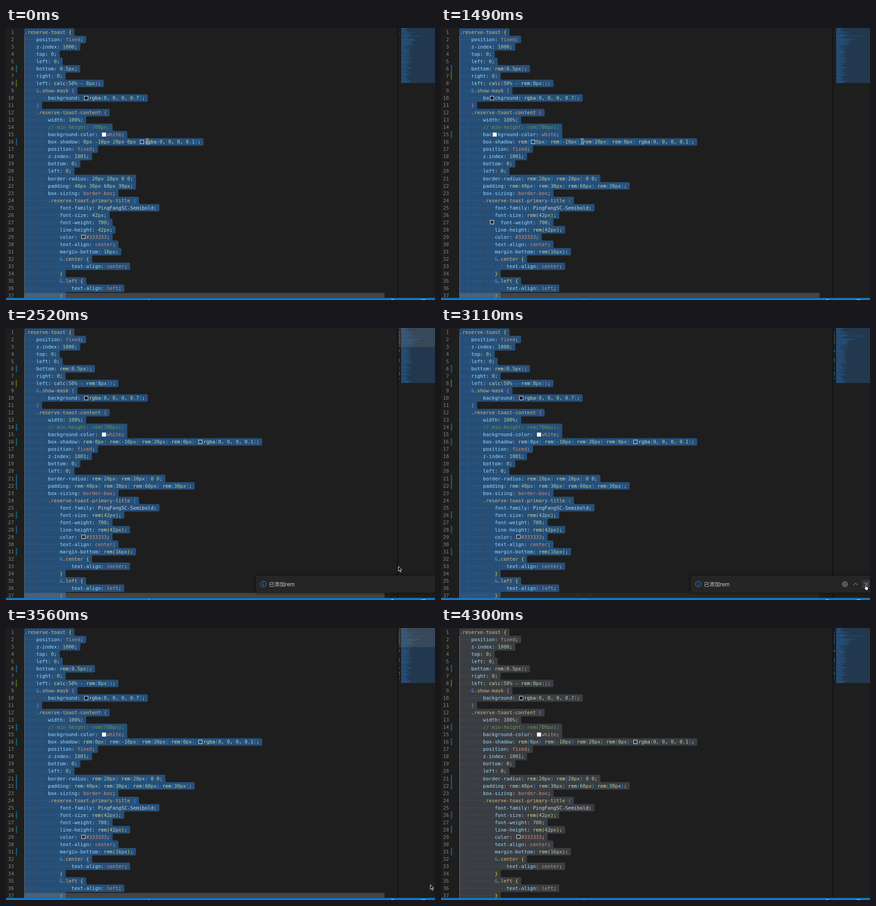
Animation, 939 px wide and 596 px high, one loop 4320 ms. Source, as an HTML page with a canvas:

```html
<!DOCTYPE html>
<html lang="en">
<head>
<meta charset="utf-8">
<title>px to rem</title>
<style>
html, body { margin: 0; width: 100%; height: 100%; overflow: hidden; background: #1e1e1e; }
canvas { display: block; }
</style>
</head>
<body>
<canvas id="stage" width="939" height="596"></canvas>
<script>
const g = document.getElementById('stage').getContext('2d');
const LOOP = 4320, X0 = 40.6, CW = 6.422, LH = 16.03, TOP = 1;
const MONO = '10.667px "DejaVu Sans Mono", monospace';
const STEPS = [0, 1340, 1490, 1630, 2230, 2380, 2520, 2670, 2810, 2960, 3110, 3410, 3560, 3700, 3850, 4150, 4300];
const BRACKETS = ['#ffd700', '#da70d6', '#179fff'];
const PLAIN = '#d4d4d4', NUMBER = '#b5cea8', WORD = '#ce9178', FUNC = '#dcdcaa';
const MODIFIED = '#1b81a8', ADDED = '#587c0c';

const before = `.reserve-toast {
    position: fixed;
    z-index: 1000;
    top: 0;
    left: 0;
    bottom: 0.5px;
    right: 0;
    left: calc(50% - 8px);
    &.show-mask {
        background: rgba(0, 0, 0, 0.7);
    }
    .reserve-toast-content {
        width: 100%;
        // min-height: 700px;
        background-color: white;
        box-shadow: 0px -10px 20px 0px rgba(0, 0, 0, 0.1);
        position: fixed;
        z-index: 1001;
        bottom: 0;
        left: 0;
        border-radius: 20px 20px 0 0;
        padding: 40px 30px 60px 30px;
        box-sizing: border-box;
        .reserve-toast-primary-title {
            font-family: PingFangSC-Semibold;
            font-size: 42px;
            font-weight: 700;
            line-height: 42px;
            color: #333333;
            text-align: center;
            margin-bottom: 16px;
            &.center {
                text-align: center;
            }
            &.left {
                text-align: left;
            }`.split('\n');
const after = before.map(s => s.replace(/-?[\d.]+px/g, 'rem($&)'));

// Swatches: line -> [column, fill]
const fills = { 10: 'rgba(0,0,0,.7)', 15: '#fff', 16: 'rgba(0,0,0,.1)', 29: '#333' };
const settled = lines => Object.fromEntries(Object.entries(fills).map(
  ([n, fill]) => [n, [lines[n - 1].search(/rgba|white|#333/), fill]]));
const shifted = { 10: [10, fills[10]], 15: [11, fills[15]], 16: [24, fills[16]], 27: [10, fills[29]] };

const cursors = [
  [0, 'beam', 309, 248.5], [2230, 'beam', 845.5, 520.5], [2380, 'arrow', 858.5, 518.5],
  [2520, 'arrow', 858.5, 522], [2670, 'arrow', 901, 554.5], [2810, 'arrow', 915.5, 554.5],
  [2960, 'arrow', 916, 562], [3110, 'hand', 926, 562], [3410, 'arrow', 928.5, 562],
  [3700, 'arrow', 913.5, 583], [3850, 'none', 0, 0]
];

function rect(color, x, y, w, h) {
  g.fillStyle = color;
  g.fillRect(x, y, w, h);
}

function round(color, x, y, w, h, r) {
  g.fillStyle = color;
  g.beginPath();
  g.roundRect(x, y, w, h, r);
  g.fill();
}

function line(color, width, ...pts) {
  g.strokeStyle = color;
  g.lineWidth = width;
  g.beginPath();
  pts.forEach(([x, y]) => g.lineTo(x, y));
  g.stroke();
}

function valueColor(tok, rest) {
  if (/^#/.test(tok)) return WORD;
  if (/^-?\d/.test(tok)) return NUMBER;
  if (/^[a-z]/.test(tok)) return rest[0] === '(' ? FUNC : WORD;
  return PLAIN;
}

// One colour per character
function paint(text, colored, state) {
  const out = Array(text.length).fill(PLAIN);
  const indent = text.search(/\S/);
  const comment = text.startsWith('//', indent);
  if (colored) {
    if (comment) out.fill('#6a9955');
    else if (/[.&]/.test(text[indent])) {
      out.fill('#d7ba7d');
      if (text[indent] === '&') out[indent] = '#569cd6';
    } else if (text.includes(':')) {
      const colon = text.indexOf(':');
      out.fill('#9cdcfe', 0, colon);
      const re = /#\w+|-?\d[\d.]*(px|%)?|[a-z][a-z-]*|[A-Z][\w-]*|./g;
      re.lastIndex = colon;
      for (let m; (m = re.exec(text));)
        out.fill(valueColor(m[0], text.slice(re.lastIndex)), m.index, re.lastIndex);
    }
  }
  if (!comment || !colored) [...text].forEach((c, i) => {
    if ('({'.includes(c)) out[i] = BRACKETS[state.depth++ % 3];
    if (')}'.includes(c)) out[i] = BRACKETS[--state.depth % 3];
  });
  return out;
}

function selection(lines, swatches, color) {
  const right = lines.map((s, i) => X0 + CW * (s.length + 1 + (swatches[i + 1] ? 2 : 0)));
  const R = 3;
  right.forEach((x, i) => {
    const y = TOP + i * LH, up = right[i - 1] || 0, down = right[i + 1] || 0;
    round(color, 40, y, x - 40, LH + .3, [i ? 0 : R, x > up ? R : 0, x > down ? R : 0, 0]);
    const notch = (ny, dir) => {
      g.beginPath();
      g.moveTo(x, ny);
      g.lineTo(x + R, ny);
      g.quadraticCurveTo(x, ny, x, ny + dir * R);
      g.fill();
    };
    if (up > x + R) notch(y, 1);
    if (down > x + R) notch(y + LH, -1);
  });
}

function guides(lines) {
  lines.forEach((s, i) => {
    const n = s.search(/\S/) / 4;
    for (let k = 0; k < n; k++)
      rect(k ? 'rgba(64,64,64,.75)' : '#707070', 40 + Math.round(k * 4 * CW), TOP + i * LH, 1, LH);
  });
}

function code(lines, swatches, colored) {
  const state = { depth: 0 };
  g.font = MONO;
  g.textBaseline = 'alphabetic';
  lines.forEach((text, i) => {
    const y = TOP + i * LH, base = y + 11.9, sw = swatches[i + 1];
    g.textAlign = 'right';
    g.fillStyle = '#858585';
    g.fillText(i + 1, 17.4, base);
    g.textAlign = 'left';
    const colors = paint(text, colored, state);
    for (let c = 0; c < text.length; c++) {
      const x = X0 + CW * (c + (sw && c >= sw[0] ? 2 : 0));
      if (text[c] === ' ') rect('rgba(227,228,226,.24)', x + 2.6, y + 7.6, 1.3, 1.3);
      else {
        g.fillStyle = colors[c];
        g.fillText(text[c], x, base);
      }
    }
    if (sw) {
      const x = Math.round(X0 + CW * sw[0] + 2) + .5, sy = Math.round(y + 3.6) + .5;
      rect(sw[1], x, sy, 8, 8);
      g.strokeStyle = '#eee';
      g.lineWidth = 1;
      g.strokeRect(x, sy, 8, 8);
    }
  });
}

function gutter(changed, added) {
  rect(ADDED, 21.5, TOP + (added - 1) * LH, 2, LH);
  changed.forEach(n => {
    const y = TOP + (n - 1) * LH;
    g.save();
    g.beginPath();
    g.rect(21.5, y, 2.8, LH);
    g.clip();
    for (let k = 0; k < 8; k++) line(MODIFIED, 1.2, [21, y + k * 2.7 + 1], [25, y + k * 2.7 - 2.5]);
    g.restore();
  });
}

function minimap(lines, marked, slider) {
  const shade = g.createLinearGradient(855, 0, 859, 0);
  shade.addColorStop(0, 'rgba(0,0,0,0)');
  shade.addColorStop(1, 'rgba(0,0,0,.5)');
  rect(shade, 855, 0, 4, 592);
  rect('#22384f', 865, 0, 74, 120.5);
  let seed = 7;
  const random = () => (seed = seed * 16807 % 2147483647) / 2147483647;
  for (let i = 0; i < 106; i++) {
    const n = i < 37 ? lines[i].length : 8 + Math.floor(random() * 24);
    rect('#264f78', 865, i * 1.135, n * .76, 1.135);
  }
  if (marked) [9, 15, 20, 25, 28, 32, 48, 50, 67, 70, 73, 87, 96, 99, 102, 110].forEach(
    y => rect(MODIFIED, 860, y, 2, 1.5));
  else rect('#777', 860.5, 10.5, 1.2, 1.2);
  if (slider) rect('rgba(121,121,121,.24)', 859, 0, 80, 42);
}

function statusBar() {
  rect('#1279ca', 0, 591.5, 939, 4.5);
  rect('#dcecf8', 312, 595, 2, 1);
  line('#e4f0fa', 1, [843, 596], [844.5, 595], [847, 595], [848.5, 596]);
  line('#e4f0fa', 1, [910, 596], [911, 595.5], [917, 595.5], [918, 596]);
}

function gear(x, y) {
  g.strokeStyle = '#c5c5c5';
  g.lineWidth = 1;
  g.beginPath();
  for (let k = 0; k <= 32; k++) {
    const a = k * Math.PI / 16, r = k % 4 < 2 ? 5.8 : 4.4;
    g.lineTo(x + r * Math.cos(a), y + r * Math.sin(a));
  }
  g.stroke();
  g.beginPath();
  g.arc(x, y, 1.8, 0, 7);
  g.stroke();
}

function toast(t) {
  g.save();
  g.shadowColor = 'rgba(0,0,0,.6)';
  g.shadowBlur = 8;
  round('#252526', 547, 542.5, 400, 37.5, 2);
  g.restore();
  g.strokeStyle = '#3794ff';
  g.lineWidth = 1;
  g.beginPath();
  g.arc(563.3, 561, 6.2, 0, 7);
  g.stroke();
  rect('#3794ff', 562.8, 557.8, 1.1, 1.2);
  rect('#3794ff', 562.8, 560, 1.1, 4.4);
  g.font = '11.7px Inter, "Noto Sans CJK SC", "Noto Sans CJK", sans-serif';
  g.fillStyle = '#ccc';
  g.fillText('已添加rem', 575.5, 565.6);
  if (t < 2670) return;
  if (t >= 3110) round('rgba(90,93,94,.31)', 921.5, 552, 18, 19, 4);
  gear(884.3, 561.5);
  line('#c5c5c5', 1, [903, 563.5], [907.5, 559], [912, 563.5]);
  line('#c5c5c5', 1, [927, 557.5], [935, 565.5]);
  line('#c5c5c5', 1, [935, 557.5], [927, 565.5]);
}

function shape(x, y, fill, edge, pts) {
  g.beginPath();
  pts.forEach(([px, py]) => g.lineTo(x + px, y + py));
  g.closePath();
  g.lineJoin = 'round';
  g.fillStyle = fill;
  g.strokeStyle = edge;
  g.lineWidth = 1;
  g.fill();
  g.stroke();
}

function cursor(kind, x, y) {
  if (kind === 'beam') {
    for (const [color, w] of [['#f4f4f4', 2.6], ['#111', 1]]) {
      line(color, w, [x - 3, y - 5.8], [x, y - 4.4], [x + 3, y - 5.8]);
      line(color, w, [x, y - 4.4], [x, y + 4.4]);
      line(color, w, [x - 3, y + 5.8], [x, y + 4.4], [x + 3, y + 5.8]);
    }
  } else if (kind === 'arrow') {
    shape(x, y, '#000', '#fff', [[.5, .5], [.5, 10.8], [2.9, 8.6], [4.7, 12.6], [6.4, 11.8], [4.7, 8], [8, 7.8]]);
  } else if (kind === 'hand') {
    shape(x, y, '#fff', '#111', [[2, 1.2], [3.4, .8], [4.2, 2], [4.6, 5], [6, 4.8], [7.4, 5.4], [8.8, 6],
      [9, 9], [8, 12.6], [3.6, 12.6], [2, 10], [.2, 7.6], [1.2, 6.6], [2.6, 7.6]]);
  }
}

function barAlpha(t) {
  const start = t >= 3560 ? 3560 : 2520;
  return .42 * Math.min(1, Math.max(0, 1 - (t - start) / 800));
}

function draw(t) {
  const lines = t < 1340 ? before : after;
  const swatches = t >= 1340 && t < 2380 ? shifted : settled(lines);
  rect('#1e1e1e', 0, 0, 939, 596);
  selection(lines, swatches, t < 4300 ? '#264f78' : '#3a3d41');
  guides(lines);
  code(lines, swatches, t < 1340 || t >= 1490);
  if (t < 1340) gutter([6, 16], 8);
  else if (t < 1630) gutter([6, 15], 7);
  else gutter([6, 14, 16, 21, 22, 26, 28, 31], 8);
  minimap(lines, t >= 1630, (t >= 2380 && t < 2670) || (t >= 3560 && t < 3850));
  if (t < 4300) rect(`rgba(121,121,121,${barAlpha(t)})`, 41, 580.5, 787.5, 10.5);
  statusBar();
  if (t >= 1630 && t < 3410) toast(t);
  cursor(...cursors.findLast(c => c[0] <= t).slice(1));
}

let shown = -1;
function tick() {
  const now = performance.now() % LOOP;
  const step = STEPS.findLast(s => s <= now);
  if (step !== shown) draw(shown = step);
  requestAnimationFrame(tick);
}
tick();
</script>
</body>
</html>
```
